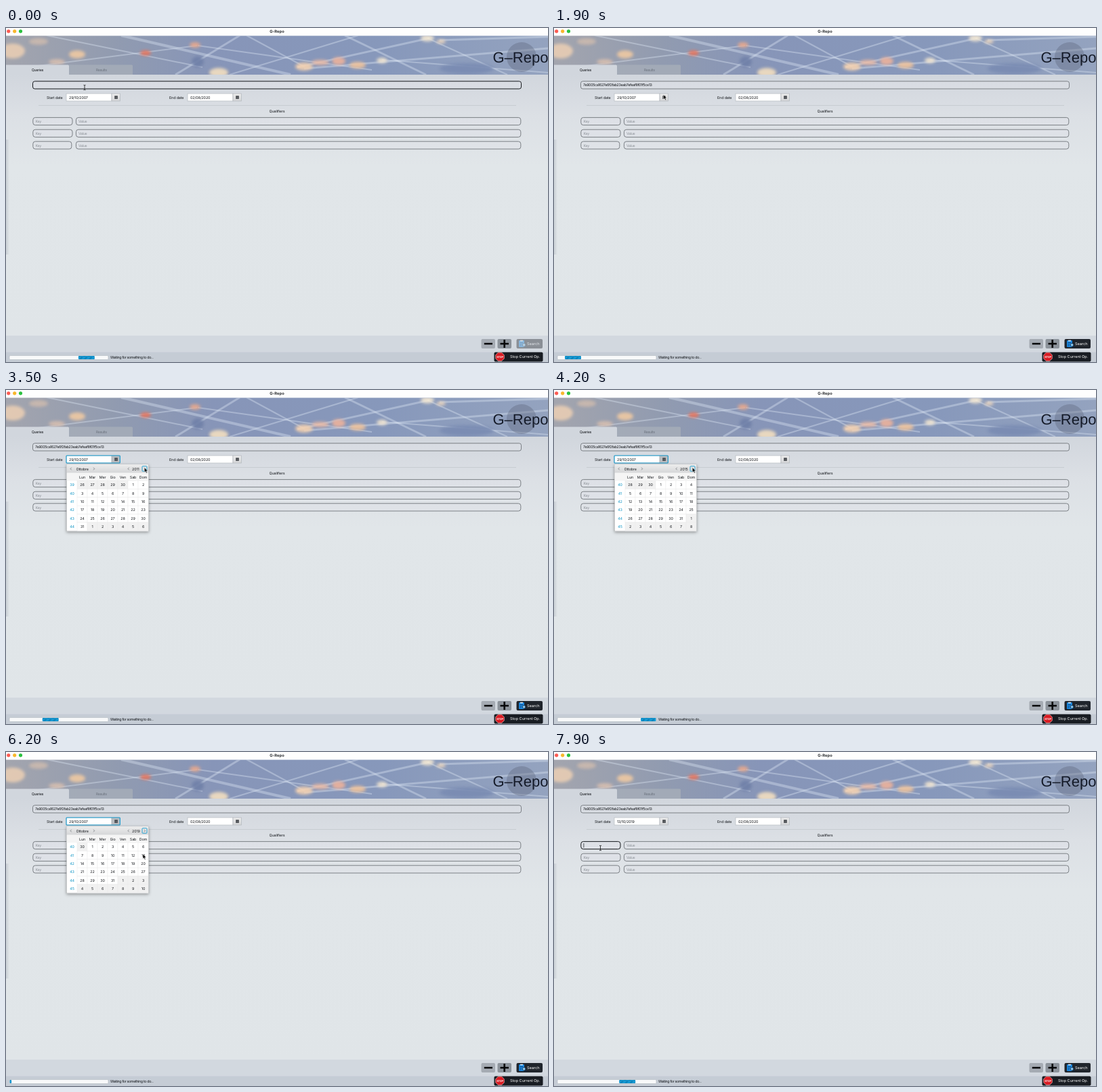
An HTML page for the animation above (8000 ms loop, 800 px wide and 494 px high).

```html
<!DOCTYPE html>
<html lang="en">
<head>
<meta charset="utf-8">
<title>G-Repo</title>
<style>
html, body { margin: 0; width: 100%; height: 100%; overflow: hidden; background: #e1e5e9 }
svg { display: block; width: 100%; height: 100% }
text { font: 5.4px Inter, "Liberation Sans", sans-serif; letter-spacing: -.14px; fill: #15181c; text-rendering: geometricPrecision; white-space: pre }
.tight { letter-spacing: -.38px }
.wide { font-size: 5.6px; letter-spacing: -.02px }
.mid { text-anchor: middle }
.hint { fill: #92979d }
.white { fill: #fff }
.week { fill: #0b93c4 }
.field { fill: #dde1e6; fill-opacity: .45; stroke: #62676d; stroke-width: .8 }
.field.hover { stroke: #15181c; stroke-width: 1 }
</style>
</head>
<body>
<svg viewBox="0 0 800 494" preserveAspectRatio="none">
  <defs>
    <linearGradient id="panel" x2="0" y2="1">
      <stop stop-color="#d1d6dd"/><stop offset=".16" stop-color="#dce0e5"/><stop offset=".35" stop-color="#e1e6e9"/><stop offset="1" stop-color="#e0e5e8"/>
    </linearGradient>
    <linearGradient id="sky">
      <stop stop-color="#a3a5ae"/><stop offset=".2" stop-color="#919bb0"/><stop offset=".38" stop-color="#8795b8"/><stop offset=".7" stop-color="#8798bb"/><stop offset="1" stop-color="#94a3bf"/>
    </linearGradient>
    <linearGradient id="edge">
      <stop stop-color="#8e98a5" stop-opacity=".3"/><stop offset="1" stop-color="#8e98a5" stop-opacity="0"/>
    </linearGradient>
    <linearGradient id="grey" x2="0" y2="1"><stop stop-color="#ececec"/><stop offset="1" stop-color="#d5d6d8"/></linearGradient>
    <pattern id="stripes" width="7" height="6" patternUnits="userSpaceOnUse">
      <path d="M0 0H7V6H0Z" fill="#1599d3"/><path d="M0 6L4 0H7L3 6Z" fill="#0d83bb"/>
    </pattern>
    <filter id="soft" x="-50%" y="-50%" width="200%" height="200%"><feGaussianBlur stdDeviation="2.2"/></filter>
    <filter id="fine" filterUnits="userSpaceOnUse" x="0" y="0" width="800" height="90"><feGaussianBlur stdDeviation=".7"/></filter>
    <filter id="shade" x="-10%" y="-10%" width="120%" height="125%"><feDropShadow dx="0" dy="1.5" stdDeviation="2" flood-opacity=".4"/></filter>
    <clipPath id="banner"><path d="M0 11.5H800V69H0Z"/></clipPath>
    <clipPath id="track"><rect x="5.5" y="485" width="145" height="5" rx="1"/></clipPath>
  </defs>

  <rect width="800" height="12" fill="#fefefe"/>
  <circle cx="3.7" cy="4.8" r="2.6" fill="#fb5b52"/>
  <circle cx="12.7" cy="4.8" r="2.6" fill="#f8b72c"/>
  <circle cx="21.5" cy="4.8" r="2.6" fill="#2bc13f"/>
  <text x="400" y="6.9" class="mid" style="font-weight:600;font-size:5.8px;letter-spacing:.05px">G-Repo</text>

  <g clip-path="url(#banner)">
    <rect y="11" width="800" height="58" fill="url(#sky)"/>
    <g id="rays" stroke="#dce6f3" filter="url(#fine)"></g>
    <g id="glows"></g>
  </g>
  <circle cx="761" cy="43" r="22" fill="#596277" opacity=".36"/>
  <text x="718.5" y="51" style="font:22px 'Liberation Sans',Arial,sans-serif;letter-spacing:0;fill:#141a28">G–Repo</text>

  <rect y="69" width="800" height="386" fill="url(#panel)"/>
  <rect y="165" width="5" height="170" fill="url(#edge)"/>
  <path d="M0 69V54.5H91.5Q93 54.5 93 56V69Z" fill="#d1d6dd"/>
  <path d="M93 69V54.5H185.5Q187 54.5 187 56V69Z" fill="#a5acb9" opacity=".9"/>
  <text x="46.3" y="63.8" class="mid tight">Queries</text>
  <text x="140.7" y="63.8" class="mid tight" style="fill:#6e7580">Results</text>

  <rect id="query" class="field" x="39.5" y="78.8" width="721" height="11.2" rx="3"/>
  <text id="token" x="43" y="86.4" class="tight">7e9005ca1627e6f2fab23eab7efeaf8f01f5ce13</text>
  <text x="60" y="104.7">Start date</text>
  <text x="241" y="104.7">End date</text>
  <g id="dates"></g>
  <path d="M48 114.5H753" stroke="#c3c8cd" stroke-width=".8"/>
  <text x="400" y="124.7" class="mid">Qualifiers</text>
  <g id="rows"></g>
  <path id="caret" d="M43.9 135V141.5" stroke="#15181c" stroke-width=".7"/>

  <rect y="455" width="800" height="25" fill="#d2d8df"/>
  <rect y="479.5" width="800" height="14.5" fill="#c5ccd5"/>
  <rect x="701.5" y="460" width="20.5" height="14" rx="2" fill="#a5abb3"/>
  <rect x="725.5" y="460" width="20.5" height="14" rx="2" fill="#8c939b"/>
  <path d="M705.8 467H718M729.5 467H742M735.7 461V473" stroke="#050608" stroke-width="2.6"/>
  <g id="search">
    <rect x="753.5" y="460" width="38.5" height="14" rx="2" fill="#20252c"/>
    <rect x="757" y="462" width="8" height="10" rx="1" fill="#1b86dc"/>
    <path d="M759 462.5H763" stroke="#d9e9f5" stroke-width="1.6"/>
    <path d="M758.5 465.5H763M758.5 468H761M758.5 470H760.5" stroke="#0c3f78" stroke-width=".8"/>
    <circle cx="764.6" cy="468.8" r="2.3" fill="#8ec8ef" stroke="#0d2c4a" stroke-width=".8"/>
    <path d="M766.2 470.6L768 472.6" stroke="#0d2c4a" stroke-width="1.3"/>
    <text x="769" y="469" class="wide white">Search</text>
  </g>
  <rect x="720.5" y="479.5" width="72" height="14" rx="2" fill="#181c22"/>
  <path d="M726.4 480H731.6L735.3 483.7V488.9L731.6 492.6H726.4L722.7 488.9V483.7Z" fill="#d91c23" stroke="#f2dada" stroke-width=".6"/>
  <text x="729" y="487.7" class="mid white" style="font-size:3.8px;font-weight:700">STOP</text>
  <text x="744" y="488.3" class="wide white">Stop Current Op.</text>
  <rect x="5" y="484.5" width="146" height="6" rx="1.5" fill="#f8f9fa" stroke="#b3bac2" stroke-width=".6"/>
  <g clip-path="url(#track)"><rect id="bar" y="485" width="24" height="5" rx="1" fill="url(#stripes)"/></g>
  <text x="154" y="489.3" class="tight">Waiting for something to do...</text>

  <g id="popup">
    <rect x="89.5" y="110" width="120.8" height="98.8" fill="#fff" stroke="#b4b7ba" stroke-width=".6" filter="url(#shade)"/>
    <rect x="89.7" y="110.3" width="120.4" height="12.4" fill="url(#grey)"/>
    <rect x="89.7" y="122.7" width="120.4" height="11.6" fill="#f5f5f5"/>
    <path d="M96.7 114.7L95 116.5L96.7 118.3M129 114.7L130.7 116.5L129 118.3M181.7 114.7L180 116.5L181.7 118.3M203.8 114.7L205.5 116.5L203.8 118.3" fill="none" stroke="#62666b" stroke-width=".7"/>
    <rect id="ring" x="201" y="112.7" width="7" height="7.5" rx="1" fill="none" stroke="#159bd0" stroke-width=".9"/>
    <text x="103.5" y="118.5">Ottobre</text>
    <text id="year" x="186" y="118.5"></text>
    <g id="days"></g>
  </g>
  <path id="arrow" d="M0 0V7L1.6 5.6L2.8 8.2L4 7.7L2.8 5.1H5Z" fill="#050505" stroke="#fff" stroke-width=".5"/>
  <path id="beam" d="M-1.5-3.7Q0-3.7 0-2.8Q0-3.7 1.5-3.7M0-2.8V2.8M-1.5 3.7Q0 3.7 0 2.8Q0 3.7 1.5 3.7" fill="none" stroke="#111" stroke-width=".8"/>
</svg>
<script>
const $ = id => document.getElementById(id);
const label = (x, y, s, cls = '') => `<text x="${x}" y="${y}" class="${cls}">${s}</text>`;
const box = (x, y, w, h, fill, more = '') => `<rect x="${x}" y="${y}" width="${w}" height="${h}" fill="${fill}" ${more}/>`;
const show = (id, on) => $(id).style.display = on ? '' : 'none';

// Banner: x1, y1, x2, y2, width
$('rays').innerHTML = [
  [0, 62, 282, 26, 2], [60, 11, 290, 58, 2], [170, 11, 420, 69, 4], [283, 26, 540, 62, 2],
  [250, 69, 345, 11, 3], [330, 69, 520, 11, 2], [355, 11, 440, 57, 2], [430, 58, 625, 15, 3],
  [440, 60, 800, 30, 3], [555, 47, 800, 66, 2], [500, 11, 620, 69, 3], [622, 15, 740, 69, 2], [640, 18, 800, 13, 3]
].map(([a, b, c, d, w]) => `<path d="M${a} ${b}L${c} ${d}" stroke-width="${w}" opacity=".38"/>`).join('');

// Banner: x, y, rx, ry, colour
$('glows').innerHTML = [
  [10, 34, 18, 11, '#e8cdb4'], [48, 20, 14, 5, '#cbb9ae'], [105, 39, 12, 6, '#efc9a3'], [75, 50, 12, 4, '#d8bfb0'],
  [206, 37, 8, 4, '#e8755c'], [279, 25, 8, 4, '#eaa98c'], [314, 66, 14, 7, '#f3dfc0'], [283, 50, 9, 8, '#6f80a8'],
  [440, 57, 13, 6, '#f4d1b0'], [464, 51, 13, 4, '#e9b9a4'], [491, 49, 10, 6, '#edb29b'], [519, 55, 12, 5, '#efc39c'],
  [555, 48, 8, 4, '#f5e8d2'], [622, 15, 10, 5, '#f3e7d3'], [642, 20, 7, 3, '#f0d9c0'], [680, 60, 40, 8, '#798bb2']
].map(([x, y, rx, ry, c]) => `<ellipse cx="${x}" cy="${y}" rx="${rx}" ry="${ry}" fill="${c}" opacity=".9" filter="url(#soft)"/>`).join('');

const datePicker = (x, id, value) =>
  box(x, 97, 67, 11, '#fff', 'stroke="#b5bac0" stroke-width=".7"') +
  box(x + 67, 97, 12.3, 11, 'url(#grey)', `id="${id}Button" stroke="#b0b5ba" stroke-width=".7"`) +
  `<path d="M${x + 71.2} 100.3h4.6v4.6h-4.6z" fill="#3b3f44"/>` +
  `<path d="M${x + 71.6} 102h3.8M${x + 71.6} 103.5h3.8" stroke="#bbb" stroke-width=".5" stroke-dasharray=".8 .5"/>` +
  box(x, 97, 79.3, 11, 'none', `id="${id}Focus" rx="1" stroke="#159bd0" stroke-width="1.1" style="display:none"`) +
  `<text id="${id}" x="${x + 4}" y="104.7">${value}</text>`;
$('dates').innerHTML = datePicker(89, 'start', '29/10/2007') + datePicker(268, 'end', '02/08/2020');

$('rows').innerHTML = [138, 155.8, 173.4].map((y, i) =>
  `<rect id="key${i}" class="field" x="39.8" y="${y - 5.6}" width="${i < 2 ? 58.2 : 57}" height="11.2" rx="3.5"/>
  <rect class="field" x="103.4" y="${y - 5.6}" width="656.4" height="11.2" rx="3.5"/>
  <text id="hint${i}" x="43.5" y="${y + 2.1}" class="hint tight">Key</text>` +
  label(107, y + 2.1, 'Value', 'hint tight')).join('');

let shownYear;
function drawCalendar(year) {
  if (year === shownYear) return;
  shownYear = year;
  const lead = (new Date(year, 9, 1).getDay() + 6) % 7;
  let out = 'Lun Mar Mer Gio Ven Sab Dom'.split(' ').map((d, i) => label(112.5 + 15 * i, 130.8, d, 'mid')).join('');
  for (let row = 0; row < 6; row++) {
    const y = 134 + 12.38 * row;
    out += label(97.5, y + 8.2, (lead > 3 ? 39 : 40) + row, 'mid week');
    for (let col = 0; col < 7; col++) {
      const date = new Date(year, 9, 1 - lead + row * 7 + col), n = date.getDate();
      const picked = year === 2007 && date.getMonth() === 9 && n === 29;
      const fill = picked ? '#0796cf' : date.getMonth() === 9 ? '#fff' : '#f1f1f1';
      out += box(105 + 15 * col, y, 15, 12.38, fill, 'stroke="#e9e9e9" stroke-width=".5"') +
        label(112.5 + 15 * col, y + 8.2, n, picked ? 'mid white' : 'mid');
    }
  }
  $('days').innerHTML = out;
  $('year').textContent = year;
}

// Linear interpolation through [time, value, ...] keys
function track(keys, t) {
  const i = Math.max(1, keys.findIndex(k => k[0] >= t));
  const [a, ...from] = keys[i - 1], [b, ...to] = keys[i];
  return from.map((v, j) => v + (to[j] - v) * (t - a) / (b - a));
}
const pointer = [[0, 116, 88], [1000, 116, 88], [1700, 161.5, 98.5], [2200, 161.5, 98.5], [2700, 204.3, 114.7],
  [5000, 204.3, 114.7], [5400, 204.3, 98.3], [5600, 204.3, 98.3], [6100, 202, 151], [6600, 202, 151],
  [6900, 208.5, 84.3], [7000, 208.5, 84.3], [7500, 68.5, 142], [8000, 68.5, 142]];
const barClock = [[0, 0], [1500, 1500], [1900, 1690], [2300, 2300], [8000, 8000]];

const easeBoth = p => p < .2 ? 3.125 * p * p : p > .8 ? 1 - 3.125 * (1 - p) ** 2 : 1.25 * p - .125;

function render(t) {
  if (t > 6200 && t < 6600) t = 6200;
  const f = easeBoth((track(barClock, t)[0] / 4000 + .396) % 1);
  $('bar').setAttribute('transform', `translate(${-19 + 170 * (1 - Math.abs(1 - 2 * f))} 0)`);

  const open = t >= 2100 && t < 6600, focused = t >= 2000 && t < 7600;
  const [x, y] = track(pointer, t);
  const inside = (l, top, r, b) => !open && x > l && x < r && y > top && y < b;
  const overQuery = inside(39, 78, 761, 90), overKey = inside(40, 132, 98, 144);
  const text = overQuery || overKey || inside(89, 97, 156, 108);
  show('beam', text);
  show('arrow', !text);
  $(text ? 'beam' : 'arrow').setAttribute('transform', `translate(${x} ${y})`);
  $('query').classList.toggle('hover', overQuery);
  $('key0').classList.toggle('hover', overKey);

  const pasted = t >= 800;
  show('token', pasted);
  $('search').setAttribute('opacity', pasted ? 1 : .4);

  show('startFocus', focused);
  $('startButton').setAttribute('fill', open ? '#babdc1' : 'url(#grey)');
  $('start').textContent = t < 6600 ? '29/10/2007' : '13/10/2019';
  show('popup', open);
  show('ring', t >= 2950);
  drawCalendar(2007 + Math.max(0, Math.min(12, Math.floor((t - 2800) / 170))));

  show('hint0', t < 7600);
  show('caret', t >= 7600);
}

function tick() {
  render(Math.floor(performance.now() % 8000 / 100) * 100);
  requestAnimationFrame(tick);
}
tick();
</script>
</body>
</html>
```
